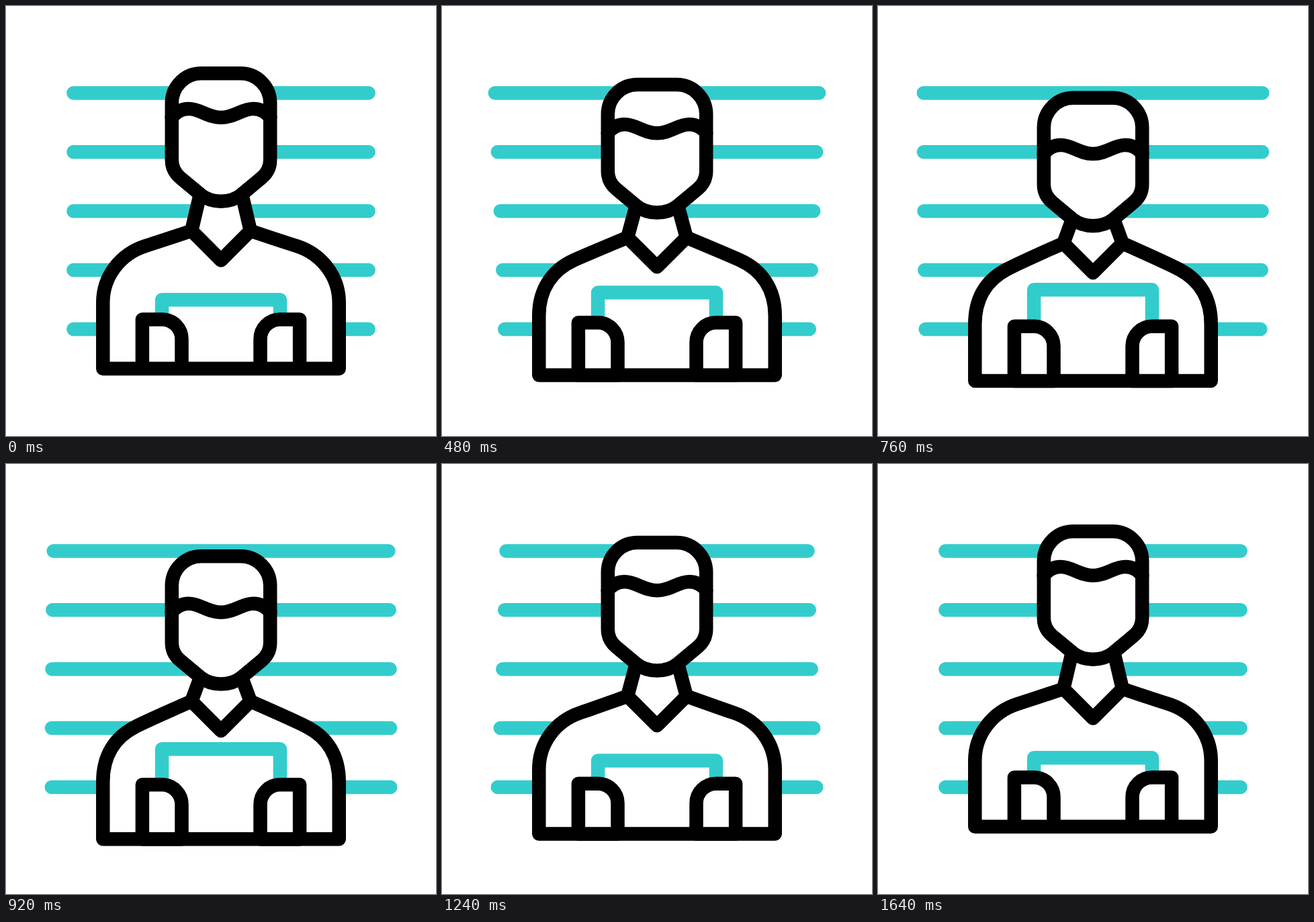
Write an HTML page that moves like this. It is 640 px wide and 640 px high and loops after 1.68 s.

```html
<!DOCTYPE html>
<html lang="en">
<head>
<meta charset="utf-8">
<title>Lineup</title>
<style>
html, body { margin: 0; width: 100%; height: 100%; overflow: hidden; background: #fff; }
svg { display: block; width: 100%; height: 100%; }
path { stroke-width: 20.5; stroke-linecap: round; stroke-linejoin: round; fill: #fff; stroke: #000; }
.teal { stroke: #3cc; fill: none; }
.open { fill: none; }
</style>
</head>
<body>
<svg viewBox="0 0 640 640">
  <path id="bars" class="teal"/>
  <path id="body"/>
  <path id="board" class="teal"/>
  <path id="handL"/>
  <path id="handR"/>
  <path id="neck"/>
  <path id="head" d="M290.7 100.3H349.3A43.9 43.9 0 0 1 393.2 144.2V229C393.2 239.4 388.4 249.2 380.3 255.8L350 281C341.5 287.6 331 290.7 320 290.7S298.5 287.6 290 281L259.7 255.8C251.6 249.2 246.8 239.4 246.8 229V144.2A43.9 43.9 0 0 1 290.7 100.3Z"/>
  <path id="hair" class="open" d="M246.8 166C254 156.500 263 153 272 153C289 153 300 166 320 166S351 153 368 153C377 153 386 156.500 393.2 166"/>
</svg>
<script>
const LOOP = 1680, STEP = 40, MOVE = 720;
const $ = id => document.getElementById(id);
const draw = (id, d) => $(id).setAttribute('d', d);
const shift = (id, y) => $(id).setAttribute('transform', `translate(0 ${y})`);

// cubic-bezier(.6, 0, .5, 1)
function ease(u) {
  if (u <= 0) return 0;
  if (u >= 1) return 1;
  let lo = 0, hi = 1, s = 0.5;
  for (let i = 0; i < 24; i++) {
    s = (lo + hi) / 2;
    const r = 1 - s;
    const x = 1.8 * s * r * r + 1.5 * s * s * r + s * s * s;
    if (x < u) lo = s; else hi = s;
  }
  return s * s * (3 - 2 * s);
}

// rises from time a, is back at rest by time b
const pulse = (t, a, b) => ease(Math.min(t - a, b - t) / MOVE);

function bars(t) {
  let d = '';
  for (let i = 0; i < 5; i++) {
    const half = 219.6 + 32.6 * pulse(t, 40 + 40 * i, 1480 + 40 * i);
    d += `M${320 - half} ${129.5 + 87.87 * i}H${320 + half}`;
  }
  return d;
}

function torso(drop, slump) {
  const x = 112 + 17 * slump, y = 357 + drop + 17 * slump;
  const hx = 38 - 8 * slump, hy = 12 + 4 * slump;
  const side = 441.6 + drop + 14 * slump;
  const base = 539.7 + drop, top = 334.6 + drop;
  const p = (m, dx, py) => `${320 + m * dx} ${py} `;
  const L = -1, R = 1;
  return `M${p(L, 43.9, top)}C${p(L, 43.9, top)}${p(L, x - hx * 0.6, y - hy * 0.6)}${p(L, x, y)}` +
    `C${p(L, x + hx, y + hy)}${p(L, 175.7, side - 39)}${p(L, 175.7, side)}` +
    `V${base}H495.7V${side}` +
    `C${p(R, 175.7, side - 39)}${p(R, x + hx, y + hy)}${p(R, x, y)}` +
    `C${p(R, x - hx * 0.6, y - hy * 0.6)}${p(R, 43.9, top)}${p(R, 43.9, top)}`;
}

function hand(m, top, base) {
  const x = 320 + m * 117.1;
  return `M${x} ${base}V${top}h${-m * 29.3}a29.3 29.3 0 0 ${m < 0 ? 1 : 0} ${-m * 29.3} 29.3V${base}Z`;
}

function render(t) {
  const drop = 18.7 * (t < 840 ? ease((t - 40) / 800) : 1 - ease((t - 840) / 800));
  const nod = 37 * pulse(t, 108, 1612);
  const lift = pulse(t, 55, 1508);
  const grip = 466.4 + drop - 8 * lift;

  draw('bars', bars(t));
  draw('body', torso(drop, pulse(t, 40, 1480)));
  draw('board', `M232.1 ${grip}V${437.2 + drop - 33.3 * lift}H407.9V${grip}`);
  draw('handL', hand(-1, grip, 539.7 + drop));
  draw('handR', hand(1, grip, 539.7 + drop));
  draw('neck', `M288 ${284 + nod}L276.1 ${334.6 + drop}L320 ${378.5 + drop}L363.9 ${334.6 + drop}L352 ${284 + nod}`);
  shift('head', nod);
  shift('hair', 55 * pulse(t, 118, 1595));
}

const start = performance.now();
function tick() {
  const t = (performance.now() - start) % LOOP;
  render(Math.floor(t / STEP) * STEP);
  requestAnimationFrame(tick);
}
tick();
</script>
</body>
</html>
```
